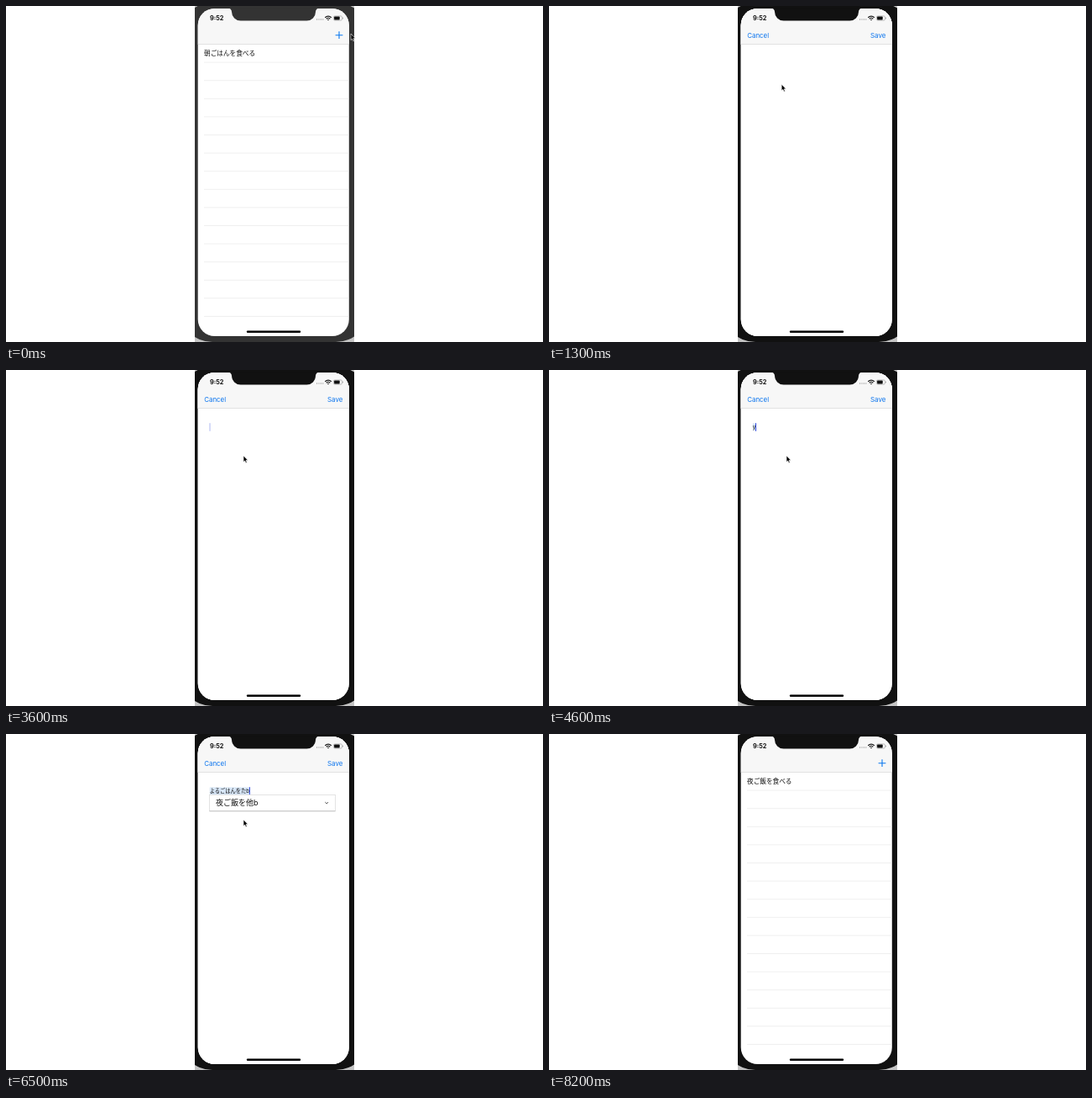
An HTML page for the animation above (9000 ms loop, 640 by 400 pixels).

```html
<!DOCTYPE html>
<html lang="ja">
<head>
<meta charset="utf-8">
<title>Memo app</title>
<style>
  html, body { margin: 0; width: 100%; height: 100%; overflow: hidden; background: #fff; }
  svg { display: block; width: 640px; height: 400px; }
  text { font-family: Inter, "Noto Sans CJK JP", "Noto Sans CJK", sans-serif; fill: #111; }
  .body { fill: var(--body, #333); }
  .bar { fill: #f7f7f7; }
  .edge { stroke: #d9d9d9; stroke-width: .7; }
  .row { stroke: #e4e4e4; stroke-width: .6; }
  .link { fill: #0a74ee; font-size: 7.9px; }
  .item { font-size: 7.65px; }
  .clock { font-size: 7.3px; font-weight: 700; }
  #typed { font-size: 6.25px; }
  #guess { font-size: 9px; }
  #plus { stroke: #0a78f0; stroke-width: 1.1; }
  #mark { fill: #d6e5f6; }
  #caret { fill: #3049dd; }
  .popup { fill: #fff; stroke: #dcdcdc; stroke-width: .8; }
</style>
</head>
<body>
<svg viewBox="0 0 640 400">
  <defs>
    <clipPath id="crop"><rect x="225" width="190" height="400"/></clipPath>
    <clipPath id="glass"><rect x="228.7" y="3" width="180.1" height="390" rx="20"/></clipPath>
  </defs>

  <g clip-path="url(#crop)">
    <rect x="225" width="190" height="400" fill="#c4c4c4"/>
    <rect class="body" x="206" y="-4" width="227" height="404" rx="40"/>
  </g>

  <g clip-path="url(#glass)">
    <rect x="228" y="3" width="182" height="390" fill="#fff"/>

    <g id="list">
      <rect class="bar" x="228" width="182" height="45.5"/>
      <path class="edge" d="M228 45.5h182"/>
      <path id="plus" d="M392.6 34.7h8.8M397 30.3v8.8"/>
      <text id="item" class="item" x="236" y="59.3"></text>
      <g id="rows"></g>
    </g>

    <g id="sheet">
      <rect x="228" width="182" height="400" fill="#fff"/>
      <rect class="bar" x="228" width="182" height="45.5"/>
      <path class="edge" d="M228 45.5h182"/>
      <text class="link" x="236.2" y="37.8">Cancel</text>
      <text class="link" x="401.3" y="37.8" text-anchor="end">Save</text>
      <rect id="mark" x="242.8" y="63.5" height="8.5"/>
      <text id="typed" x="242.8" y="70.3"></text>
      <rect id="caret" y="63.2" width="1" height="9.6"/>
      <g id="popup">
        <rect class="popup" x="242.5" y="72.4" width="150" height="19.4"/>
        <path d="M242.5 91.8h150" stroke="#bbb" stroke-width=".8"/>
        <text id="guess" x="250" y="85.4"></text>
        <path d="M380.4 81.2l1.8 1.7 1.8-1.7" fill="none" stroke="#333" stroke-width=".9"/>
      </g>
    </g>

    <text class="clock" x="243" y="17.1">9:52</text>
    <path d="M370.6 16h8" stroke="#999" stroke-width="1.3" stroke-linecap="round" stroke-dasharray="0 2.4"/>
    <path d="M380.2 13.7q3.8-3.2 7.6 0M381.7 15.2q2.3-1.9 4.6 0M383.2 16.5h1.6"
          fill="none" stroke="#111" stroke-width="1.2"/>
    <rect x="390.4" y="11.9" width="10" height="5.2" rx="1.4" fill="none" stroke="#999" stroke-width=".6"/>
    <rect x="391.1" y="12.6" width="6.6" height="3.8" rx=".7" fill="#111"/>
    <path d="M401.5 13.7v1.6" stroke="#999" stroke-width=".8"/>
    <rect x="286.8" y="386.5" width="64.4" height="2.4" rx="1.2" fill="#000"/>
  </g>

  <path class="body" d="M264.5 2.5a4.5 4.5 0 0 1 4.5 4.5a10.5 10.5 0 0 0 10.5 10.5h79
    a10.5 10.5 0 0 0 10.5-10.5a4.5 4.5 0 0 1 4.5-4.5z"/>
  <path id="cursor" d="M0 0V7.6L1.7 6.1 2.9 8.8 4.2 8.2 3 5.6H5.3Z"
        fill="#000" stroke="#fff" stroke-width=".6"/>
</svg>

<script>
const LOOP = 9000, TICK = 100, HEIGHT = 400;
const FOCUS = 1700, STRAY = 2400, ERASE = 3200, COMMIT = 7000;
const OPEN = 486, CLOSE = 7586;
const $ = id => document.getElementById(id);
const show = (el, on) => el.style.display = on ? '' : 'none';
const clamp = v => Math.min(1, Math.max(0, v));

// Pointer: an eased move to each key point.
const home = { x: 411, y: 33 };
const moves = [
  { from: 0, to: 200, x: 396.8, y: 35 },
  { from: 1000, to: 1400, x: 255, y: 104 },
  { from: 1400, to: 1500, x: 283, y: 102 },
  { from: 7100, to: 7480, x: 388, y: 35.5 }
];

function pointer(t) {
  let { x, y } = home;
  for (const m of moves) {
    const p = clamp((t - m.from) / (m.to - m.from));
    const eased = p * p * (3 - 2 * p);
    x += (m.x - x) * eased;
    y += (m.y - y) * eased;
  }
  return `translate(${x.toFixed(2)} ${y.toFixed(2)})`;
}

// Typing: one key per tick within a burst, turned into kana and then kanji.
const bursts = { 4600: 'y', 4900: 'oru', 5500: 'gohannwotaberu' };
const keys = Object.entries(bursts).flatMap(([start, word]) =>
  [...word].map((char, i) => ({ char, time: +start + i * TICK })));
const kana = { yo: 'よ', ru: 'る', go: 'ご', ha: 'は', nn: 'ん', wo: 'を', ta: 'た', be: 'べ' };
const kanji = { よる: '夜', ごはん: 'ご飯', たべ: '食べ', た: '他' };
const edits = [FOCUS, STRAY, ERASE, ...keys.map(k => k.time), COMMIT];

const convert = (text, map) =>
  text.replace(new RegExp(Object.keys(map).join('|'), 'g'), part => map[part]);

function input(t) {
  if (t >= STRAY && t < ERASE) return { typed: 'Y', guess: '' };
  const raw = keys.filter(k => k.time <= t).map(k => k.char).join('');
  const reading = convert(raw, kana);
  const guess = convert(reading, kanji);
  if (t >= COMMIT) return { typed: guess, guess: '' };
  return { typed: reading, guess: raw.length > 1 ? guess : '' };
}

// The blink starts afresh with every edit.
function caretOpacity(t) {
  if (t < FOCUS) return 0;
  const idle = t - edits.findLast(time => time <= t);
  return clamp(.7 + .8 * Math.cos(2 * Math.PI * (idle - 150) / 800));
}

// Critically damped spring: 1 at the start, settling to 0.
function spring(ms) {
  const x = Math.max(0, ms) * .01805;
  return (1 + x) * Math.exp(-x);
}

function sheetTop(t) {
  return HEIGHT * (t < CLOSE ? spring(t - OPEN) : 1 - spring(t - CLOSE));
}

function draw(t) {
  document.body.style.setProperty('--body', t < 300 ? '#333' : '#111');

  $('item').textContent = t < CLOSE ? '朝ごはんを食べる' : '夜ご飯を食べる';
  $('plus').style.opacity = t >= 400 && t < 1100 ? .65 : 1;
  $('sheet').setAttribute('transform', `translate(0 ${sheetTop(t).toFixed(2)})`);

  const { typed, guess } = input(t);
  $('typed').textContent = typed;
  $('guess').textContent = guess;
  const width = typed ? $('typed').getComputedTextLength() : 0;
  $('mark').setAttribute('width', width);
  show($('mark'), t >= keys[0].time && t < COMMIT);
  show($('popup'), guess);
  $('caret').setAttribute('x', 242.5 + width);
  $('caret').style.opacity = caretOpacity(t);

  $('cursor').setAttribute('transform', pointer(t));
  show($('cursor'), t < 8200);
}

for (let i = 0; i < 15; i++) {
  const y = (67.1 + i * 21.6).toFixed(1);
  $('rows').insertAdjacentHTML('beforeend', `<path class="row" d="M236 ${y}h174"/>`);
}

const start = performance.now();
function frame() {
  const t = (performance.now() - start) % LOOP;
  draw(Math.floor(t / TICK) * TICK);
  requestAnimationFrame(frame);
}
frame();
</script>
</body>
</html>
```
